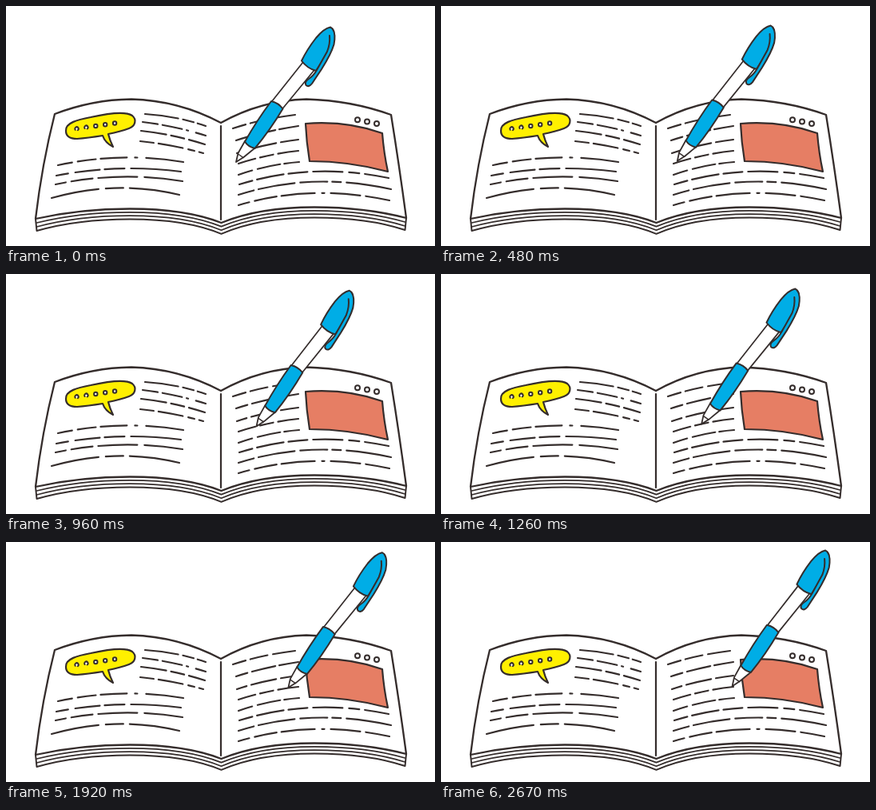
An HTML page with a canvas for the animation above (2.7 s loop, 537 px wide and 300 px high).

```html
<!DOCTYPE html>
<html lang="en">
<head>
<meta charset="utf-8">
<title>Writing in a book</title>
<style>
html, body { margin: 0; width: 100%; height: 100%; overflow: hidden; background: #fff; }
canvas { display: block; }
</style>
</head>
<body>
<canvas id="stage" width="537" height="300"></canvas>
<script>
const ctx = document.getElementById('stage').getContext('2d');
const INK = '#352d2c', BLUE = '#00ade6', YELLOW = '#fff000', RED = '#e67e64';
const LOOP = 2700, STEP = 30, GLIDE = 2530;

function shape(d, fill, width = 2, target = ctx) {
  const path = new Path2D(d);
  if (fill) { target.fillStyle = fill; target.fill(path); }
  if (width) { target.lineWidth = width; target.stroke(path); }
}

function pens(c) {
  c.strokeStyle = INK;
  c.lineCap = c.lineJoin = 'round';
}

function ring(c, x, y, r, width, from = 0, to = Math.PI * 2) {
  c.beginPath();
  c.arc(x, y, r, from, to);
  c.fillStyle = '#fff';
  c.fill();
  c.lineWidth = width;
  c.stroke();
}

// lower edge of the pages; sheet 0 is the top page, 3 the last one
function pageEdge(sheet) {
  const side = 266 + sheet * 5, fold = 271 + sheet * 4.6, crest = 253.5 + sheet * 4.3;
  const inset = Math.min(sheet, 1) * 1.5;
  return `${37 + inset} ${side}C75 ${crest + 4} 112 ${crest} 155 ${crest}` +
    `C200 ${crest} 240 ${crest + 6} 269.5 ${fold}` +
    `C300 ${crest + 5} 340 ${crest - 2} 386 ${crest - 2}` +
    `C430 ${crest - 2} 468 ${crest + 3} ${501 - inset} ${side - 1}`;
}

function drawBook(c) {
  const put = (d, fill, width) => shape(d, fill, width, c);

  put(`M37 266L${pageEdge(3)}L501 265`, '#fff', 2);
  put('M' + pageEdge(2), null, 1.7);
  put('M' + pageEdge(1), null, 1.7);
  put(`M${pageEdge(0)}Q492 198 482 136Q432 118 376 116.5Q319 118 269 146` +
      'Q216 118 157 116.5Q108 117 61 135Q45 198 37 266Z', '#fff', 2.3);
  put('M269 150L269 267', null, 2.2);

  // lines of writing
  const row = (d, dashes) => {
    c.setLineDash(dashes);
    put(d, null, 2.2);
    c.setLineDash([]);
  };
  row('M174 135Q212 137 250 150', [42, 6, 14, 5, 40]);
  row('M171 145Q212 150 250 162', [19, 6, 25, 6, 2, 10, 40]);
  row('M169 156Q208 160 249 173', [32, 6, 17, 6, 40]);
  row('M168 169Q208 173 247 184', [17, 6, 31, 7, 8, 6, 30]);

  row('M65 199Q145 182 222 195', [18, 7, 23, 6, 33, 10, 3, 11, 70]);
  row('M63 212Q140 197 219 207', [15, 9, 31, 6, 25, 8, 90]);
  row('M62 223Q142 206 221 219', [13, 7, 27, 7, 49, 9, 60]);
  row('M57 240Q138 217 217 236', [60, 9, 22, 8, 80]);

  row('M284 153Q320 141 362 136', [17, 6, 22, 7, 40]);
  row('M288 168Q325 156 366 150', [15, 6, 30, 5, 50]);
  row('M289 184Q325 172 366 167', [13, 6, 32, 6, 40]);
  row('M291 197Q328 185 366 181', [22, 6, 17, 6, 40]);
  row('M291 211Q328 198 367 195', [18, 7, 29, 5, 40]);

  row('M292 223Q382 195 479 215', [17, 6, 34, 6, 24, 7, 37, 8, 13, 7, 50]);
  row('M291 236Q382 207 482 229', [20, 6, 46, 7, 34, 6, 11, 7, 60]);
  row('M291 249Q382 222 480 243', [14, 7, 28, 6, 42, 9, 3, 8, 37, 7, 50]);

  // speech bubble
  put('M75 156C74 146 90 142 106 139C124 135 149 131 158 137C164 142 162 150 154 153' +
      'Q143 157 128 160Q130 168 134 176Q124 171 121 162Q102 165 89 166C80 166 75 163 75 156Z', YELLOW, 2.2);
  for (let i = 0; i < 5; i++) {
    ring(c, 88.5 + i * 11.9, 153.5 - i * 1.75, 2.2, 2, i < 2 ? 2.5 : 0, i < 2 ? 7.2 : 7);
  }

  // picture with three rings
  put('M375 147Q426 143 471 159Q473 184 478 207Q430 194 380 194Q376 170 375 147Z', RED, 2.2);
  ring(c, 440, 142.2, 3, 2);
  ring(c, 452, 144.6, 3, 2);
  ring(c, 464, 147, 3, 2);
}

function drawPen() {
  // white point and nib
  shape('M299 169L290.5 184L288 195L297.5 189L311 178Z', '#fff', 1.8);
  shape('M290.5 185L297 189.5', null, 1.5);
  // barrel and grip
  shape('M372 70L333 119L346 128.5L386 80Z', '#fff', 1.7);
  shape('M332 119Q341 121 346.5 128.5Q330 156 311.5 178Q303 176 299 169.5Q314 143 332 119Z', BLUE, 2);
  // cap and clip
  shape('M370 68.5Q377 54 388 40Q398 28 406 26.5Q412 29 410 40Q402 61 388 81Q377 78 370 68.5Z', BLUE, 2);
  shape('M409 29Q413 35 410.5 48Q407 60 395 79L383 97Q379 102 375.5 99Q373 95 379 91Q385 87 389 80' +
        'L402 57Q406 47 405 37', BLUE, 2);
}

const book = document.createElement('canvas');
book.width = 537;
book.height = 300;
const bookCtx = book.getContext('2d');
pens(bookCtx);
drawBook(bookCtx);
pens(ctx);

function render(t) {
  const glide = (1 - Math.cos(Math.PI * Math.min(t / GLIDE, 1))) / 2;
  const sway = Math.sin(Math.PI * t / 1620) ** 2;
  ctx.fillStyle = '#fff';
  ctx.fillRect(0, 0, 537, 300);
  ctx.drawImage(book, 0, 0);
  ctx.save();
  ctx.translate(405 + 75 * glide, 26 - 15 * glide - 1.2 * sway);
  ctx.rotate(-0.012 * sway);
  ctx.translate(-405, -26);
  drawPen();
  ctx.restore();
}

const start = performance.now();
function tick() {
  const t = (performance.now() - start) % LOOP;
  render(Math.floor(t / STEP) * STEP);
  requestAnimationFrame(tick);
}
tick();
</script>
</body>
</html>
```
